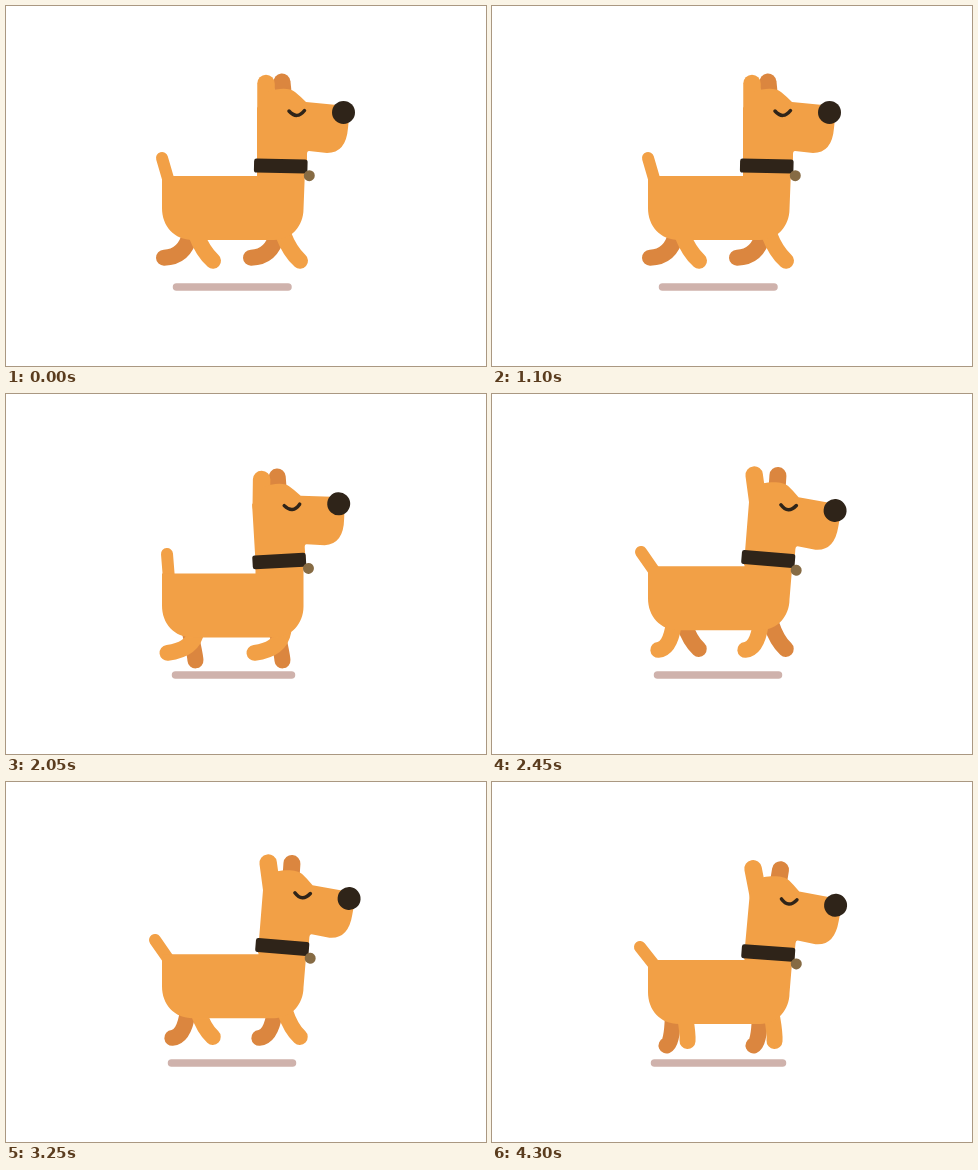
Animation, 480 px wide and 360 px high, one loop 4350 ms. Source, as an HTML page with a canvas:

```html
<!DOCTYPE html>
<html>
<head>
<meta charset="utf-8">
<title>Trotting dog</title>
<style>
html, body { margin: 0; width: 100%; height: 100%; overflow: hidden; background: #fff; }
canvas { display: block; }
</style>
</head>
<body>
<canvas id="stage" width="480" height="360"></canvas>
<script>
const ctx = document.getElementById('stage').getContext('2d');
const COAT = '#f2a046', SHADE = '#db863f', DARK = '#2f2419', BRASS = '#866b44', SHADOW = '#cfb2ac';
const DEG = Math.PI / 180;
const FRONT = 87; // distance from hind to front legs

// Bobbing value with a period of six poses, through a, b, c at poses 0, -1, -2.
function wave(pose, a, b, c) {
  const mid = a - b + c, turn = pose * 60 * DEG;
  const side = ((a + mid) / 2 - b) / Math.sin(60 * DEG);
  return mid + (a - mid) * Math.cos(turn) + side * Math.sin(turn);
}

function fill(path, color) {
  ctx.fillStyle = color;
  ctx.fill(new Path2D(path));
}

function stroke(path, width, color) {
  ctx.lineWidth = width;
  ctx.strokeStyle = color;
  ctx.stroke(new Path2D(path));
}

function dot(x, y, r, color) {
  ctx.fillStyle = color;
  ctx.beginPath();
  ctx.arc(x, y, r, 0, 7);
  ctx.fill();
}

// A full stride takes twelve poses; hip, bend and foot each circle an ellipse.
function legs(pose, belly, color) {
  const turn = pose * 30 * DEG;
  const orbit = (mid, c, s) => mid + c * Math.cos(turn) + s * Math.sin(turn);
  const reach = 1.5 * Math.cos(2 * turn) - 5.5 * Math.sin(2 * turn);
  const hip = orbit(187, -3, 5.5);
  const bendX = orbit(188, -9, 4), bendY = belly + orbit(14.5, 2.5, -4);
  const footX = orbit(181, -24.5, -2) + reach, footY = belly + orbit(19.2, -1.5, -3.5);
  for (const dx of [0, FRONT]) {
    stroke(`M${hip + dx},${belly - 6} Q${bendX + dx},${bendY} ${footX + dx},${footY}`, 16, color);
  }
}

function head(x, y, bob) {
  ctx.save();
  ctx.translate(x, y);
  ctx.rotate(bob(0, 4.6, 5.2) * DEG);
  stroke(`M3,-64 L${bob(1, 2.7, 4.4)},-84`, 17, SHADE);
  stroke(`M-15,-55 L${bob(-15, -21, -23)},-82.5`, 17.5, COAT);
  fill('M-24,8 V-58 L-12,-75 C-4,-77 8,-79 14,-74 Q19,-70 25,-64 L56,-61 ' +
    'Q67,-60 68,-48 L67,-38 Q65,-13 46,-13 L28,-15 Q26,-15 26,-12 V8 Z', COAT);
  dot(62.5, -53.6, 11.5, DARK);
  stroke('M8,-55 Q16,-46 23.5,-55.5', 3.5, DARK);
  ctx.rotate(bob(1.3, 0, -1.2) * DEG);
  ctx.fillStyle = DARK;
  ctx.beginPath();
  ctx.roundRect(-27, -7, 53.5, 14, 2.5);
  ctx.fill();
  dot(28.5, 9, 5.5, BRASS);
  ctx.restore();
}

function draw(pose) {
  const bob = (a, b, c) => wave(pose, a, b, c);
  const back = bob(170, 172.2, 178), belly = back + 64;
  const neckX = bob(275, 276.5, 276.5), neckY = bob(160, 165, 171);

  ctx.fillStyle = '#fff';
  ctx.fillRect(0, 0, 480, 360);
  ctx.lineCap = 'round';

  stroke(`M${bob(170.5, 165.5, 162.5)},281 H${bob(282, 286.5, 290.5)}`, 7.5, SHADOW);
  legs(pose, belly, SHADE);
  stroke(`M163,${back + 6} L${bob(156, 149, 148)},${bob(152, 158, 165)}`, 12, COAT);
  legs(pose + 6, belly, COAT);
  fill(`M156,${back} H${neckX - 24} V${neckY} L${neckX + 24},${neckY + 4}
    L297.5,${back + 33} C297.5,${back + 50} 285,${belly} 268,${belly}
    H187 C168,${belly} 156,${back + 50} 156,${back + 32} Z`, COAT);
  head(neckX, neckY, bob);
}

const start = performance.now();
function tick() {
  const step = Math.floor((performance.now() - start) / 50) % 87;
  // Poses advance slightly faster than the picture rate.
  draw(Math.max(0, Math.floor(step * 1.0935 - 0.035)));
  requestAnimationFrame(tick);
}
tick();
</script>
</body>
</html>
```
